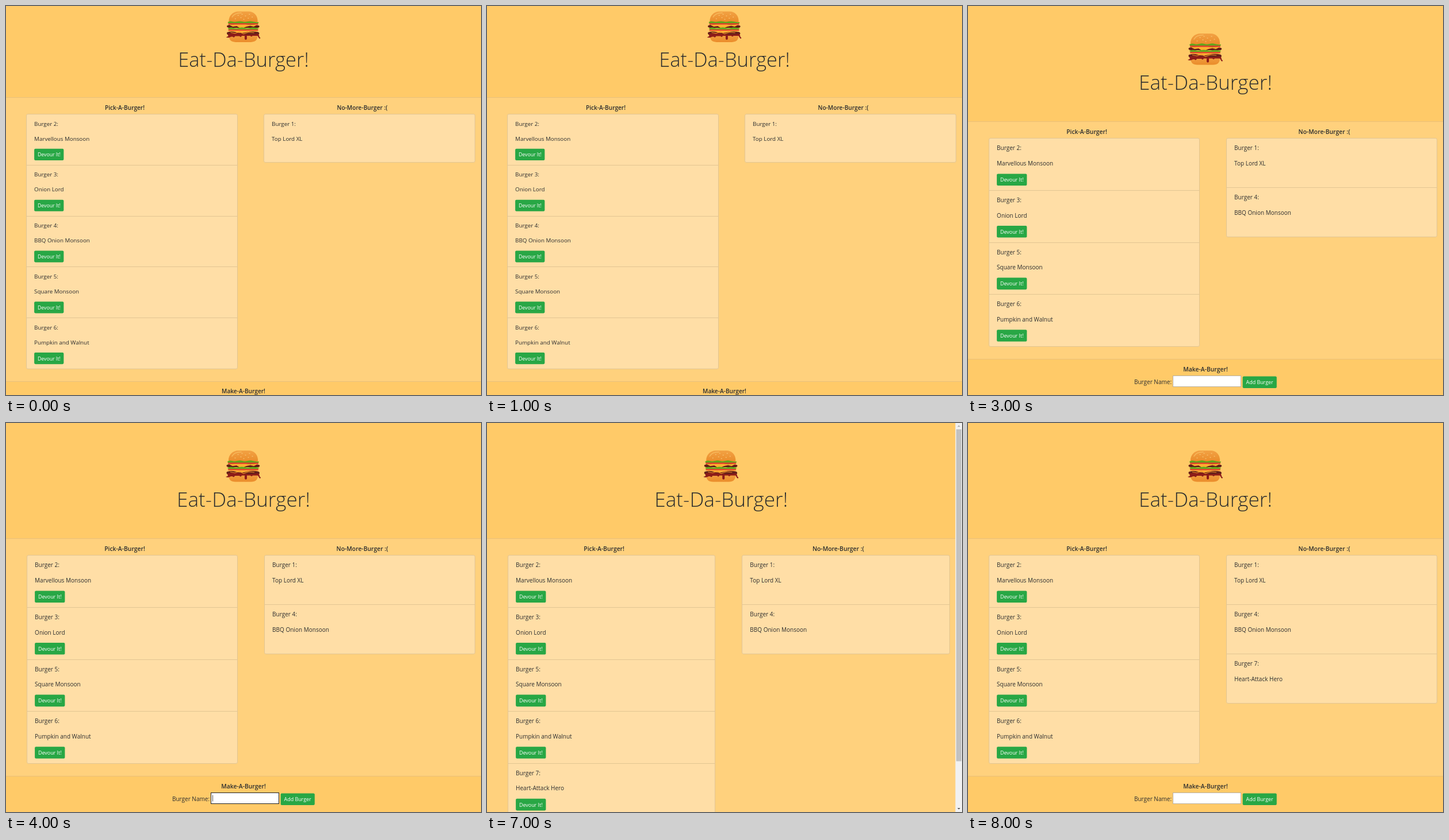
An HTML page for the animation above (9 s loop, 826 by 678 pixels).

```html
<!DOCTYPE html>
<html lang="en">
<head>
<meta charset="utf-8">
<title>Eat-Da-Burger!</title>
<style>
html, body { margin: 0; width: 100%; height: 100%; overflow: hidden; background: #ffd17d; }
svg { display: block; width: 826px; height: 678px; }
text { font-family: "Open Sans", "Noto Sans", sans-serif; fill: #2b2d2e; white-space: pre; }
.title { font-weight: 300; text-anchor: middle; }
.head { font-weight: 600; text-anchor: middle; }
.label { fill: #fff; font-weight: 500; }
.band { fill: #ffca68; }
.rule { fill: #e9c07b; }
.card { fill: #ffdea6; stroke: #e2c592; }
</style>
</head>
<body>
<svg id="stage" viewBox="0 0 826 678">
  <defs>
    <linearGradient id="bun" x2="0" y2="1">
      <stop offset="0" stop-color="#f2a244"/>
      <stop offset="1" stop-color="#ea8c2a"/>
    </linearGradient>
    <g id="burger">
      <path d="M5 40H56V44Q56 55.500 44 55.500H17Q5 55.500 5 44Z" fill="url(#bun)"/>
      <path d="M5 20C4 8 13 1 22 1H40C49 1 57 8 56 20Z" fill="url(#bun)"/>
      <path d="M11 11C14 5 20 3.500 27 3.500" fill="none" stroke="#f7b95c" stroke-width="1.500" stroke-linecap="round"/>
      <path d="M21 8h1M28 6h1M34 9h1M41 6h1M46 11h1M26 12h1M39 13h1M16 14h1M31 15h1" stroke="#fbd28a" stroke-linecap="round"/>
      <path d="M3 20Q7 17.500 11 19T20 19T29 19T38 19T47 19T58 20L57 22.500H4Z" fill="#62a51c"/>
      <rect x="4" y="22" width="53" height="2.800" rx="1.400" fill="#df3f2b"/>
      <path d="M2 26Q10 23.500 18 25.500T35 25T58 26Q61 28 57 30H5Q0 29 2 26Z" fill="#611d16"/>
      <path d="M5 24.500H56L49 28L43 26.500L36 28L27 32L19 27L12 28Z" fill="#ffb02e"/>
      <path d="M3 31Q8 28.500 13 30T23 30T33 30T43 30T58 31L56 33.500H5Z" fill="#65a91d"/>
      <rect x="4" y="33" width="53" height="2.800" rx="1.400" fill="#e4472c"/>
      <path d="M5 35.500H57L49 39H11Z" fill="#ffae31"/>
      <path d="M2 38Q10 35.500 18 38T36 38T57 37.500Q61 40 57 43H5Q0 42 2 38Z" fill="#65201a"/>
      <path d="M3 41Q15 39 28 41T56 41Q59 42 59 46L61 48Q60 51 58 48L56 44.500H47Q45 47 43 44.500H37V50Q35 53 33 50V44.500H28Q26 48 24 45H16Q14 49 12 46H9Q5 49 0 47L4 45Z" fill="#8d1c19"/>
      <path d="M8 38.500L16 40L24 37.500L31 41L40 38L50 39" fill="none" stroke="#ed8c28" stroke-width="1.200"/>
    </g>
  </defs>
  <g id="page"></g>
</svg>
<script>
const NAMES = {
  1: "Top Lord XL", 2: "Marvellous Monsoon", 3: "Onion Lord", 4: "BBQ Onion Monsoon",
  5: "Square Monsoon", 6: "Pumpkin and Walnut", 7: "Heart-Attack Hero"
};

// Zoom, page width and vertical anchors of the two views
const scrolled = { k: .98, w: 826, logo: 8.5, title: 106, top: 159, list: 188.5, foot: 654 };
const full = { k: 1, w: 826, logo: 47, title: 146, top: 201, list: 230.8, foot: 615 };
const narrow = { ...full, w: 814.5, foot: 705, bar: true };
const rest = [2, 3, 5, 6];

const SCENES = [
  { at: 0, view: scrolled, pick: [2, 3, 4, 5, 6], gone: [1] },
  { at: 2000, view: scrolled, pick: [2, 3, 4, 5, 6], gone: [1], press: 4 },
  { at: 3000, view: full, pick: rest, gone: [1, 4] },
  { at: 4000, view: full, pick: rest, gone: [1, 4], caret: true },
  { at: 5000, view: full, pick: rest, gone: [1, 4], typed: NAMES[7], caret: true },
  { at: 6000, view: full, pick: rest, gone: [1, 4], typed: NAMES[7], press: "add" },
  { at: 7000, view: narrow, pick: [...rest, 7], gone: [1, 4] },
  { at: 8000, view: full, pick: rest, gone: [1, 4, 7] }
];
const LOOP = 9000;

// Centre of the nearest pixel, for crisp hairlines
const snap = v => Math.floor(v) + .5;

const rect = (x, y, w, h, attrs) =>
  `<rect x="${x}" y="${y}" width="${w}" height="${h}" ${attrs}/>`;
const text = (x, y, size, str, cls = "") =>
  `<text x="${x}" y="${y}" font-size="${size}" class="${cls}">${str}</text>`;

function button(x, y, w, k, label, pressed) {
  const h = 20.6 * k;
  const ring = pressed
    ? rect(x - 1.6, y - 1.6, w + 3.2, h + 3.2, 'rx="3.6" fill="#48b461" fill-opacity=".55"') : "";
  return ring + rect(x, y, w, h, `rx="2.1" fill="${pressed ? "#218838" : "#28a745"}"`) +
    text(x + 6 * k, y + 13.8 * k, 8.9 * k, label, "label");
}

function list(ids, x, right, step, view, press, buttons) {
  const { k, list: y } = view;
  const left = snap(x), width = snap(right - .5) - left;
  const height = snap(y + step * ids.length) - snap(y);
  let out = rect(left, snap(y), width, height, 'rx="2.6" class="card"');
  ids.forEach((id, i) => {
    const top = y + i * step, tx = x + 13.6 * k;
    if (i) out += `<path d="M${left} ${snap(top)}h${width}" class="card"/>`;
    out += text(tx, top + 20.5 * k, 10 * k, `Burger ${id}:`) +
      text(tx, top + 47.1 * k, 10 * k, NAMES[id]);
    if (buttons) out += button(tx, top + 61.6 * k, 52.3 * k, k, "Devour It!", press === id);
  });
  return out;
}

function form(y, { typed = "", caret, press }) {
  const border = caret ? "#202020" : "#b9b0a0";
  const base = y + 43.5;
  return text(289, base, 10, "Burger Name:") +
    rect(356.5, y + 29.5, 118, 19, `fill="${typed ? "#e8f0fe" : "#fff"}" stroke="${border}"`) +
    text(358, base, 10.1, typed) +
    (caret ? rect(typed ? 443.5 : 359, y + 33.5, .8, 11, 'fill="#222"') : "") +
    button(477.6, y + 30.5, 59.2, 1, "Add Burger", press === "add");
}

function scrollbar() {
  return rect(814.5, 0, 11.5, 678, 'fill="#f1f1f1"') +
    rect(816, 11, 9, 578.5, 'fill="#c1c1c1"') +
    '<path d="M818 6.500L820.500 4L823 6.500Z" fill="#a3a3a3"/>' +
    '<path d="M818 671L820.500 673.500L823 671Z" fill="#505050"/>';
}

function draw(scene) {
  const v = scene.view, { k, w } = v, mid = w / 2;
  const edge = 36.5 * k;
  const head = (x, y, str) => text(x, y, 10.35 * k, str, "head");
  return rect(0, 0, 826, 678, 'fill="#ffd17d"') +
    rect(0, 0, w, v.top, 'class="band"') + rect(0, v.top, w, 1, 'class="rule"') +
    `<use href="#burger" transform="translate(${mid - 31 * k} ${v.logo}) scale(${k})"/>` +
    text(mid, v.title, 35.2 * k, "Eat-Da-Burger!", "title") +
    head(w / 4, v.top + 22 * k, "Pick-A-Burger!") +
    head(w * .75, v.top + 22 * k, "No-More-Burger :(") +
    list(scene.pick, edge, mid - 10, 90.6 * k, v, scene.press, true) +
    list(scene.gone, mid + edge, w - 10, 86 * k, v) +
    rect(0, v.foot, w, 80, 'class="band"') + rect(0, v.foot, w, 1, 'class="rule"') +
    head(mid, v.foot + 21.7 * k, "Make-A-Burger!") +
    (v === full ? form(v.foot, scene) : "") +
    (v.bar ? scrollbar() : "");
}

const page = document.getElementById("page");
const start = performance.now();
let shown;

function tick() {
  const t = (performance.now() - start) % LOOP;
  const scene = SCENES.findLast(s => s.at <= t);
  if (scene !== shown) {
    page.innerHTML = draw(scene);
    shown = scene;
  }
  requestAnimationFrame(tick);
}
tick();
</script>
</body>
</html>
```
